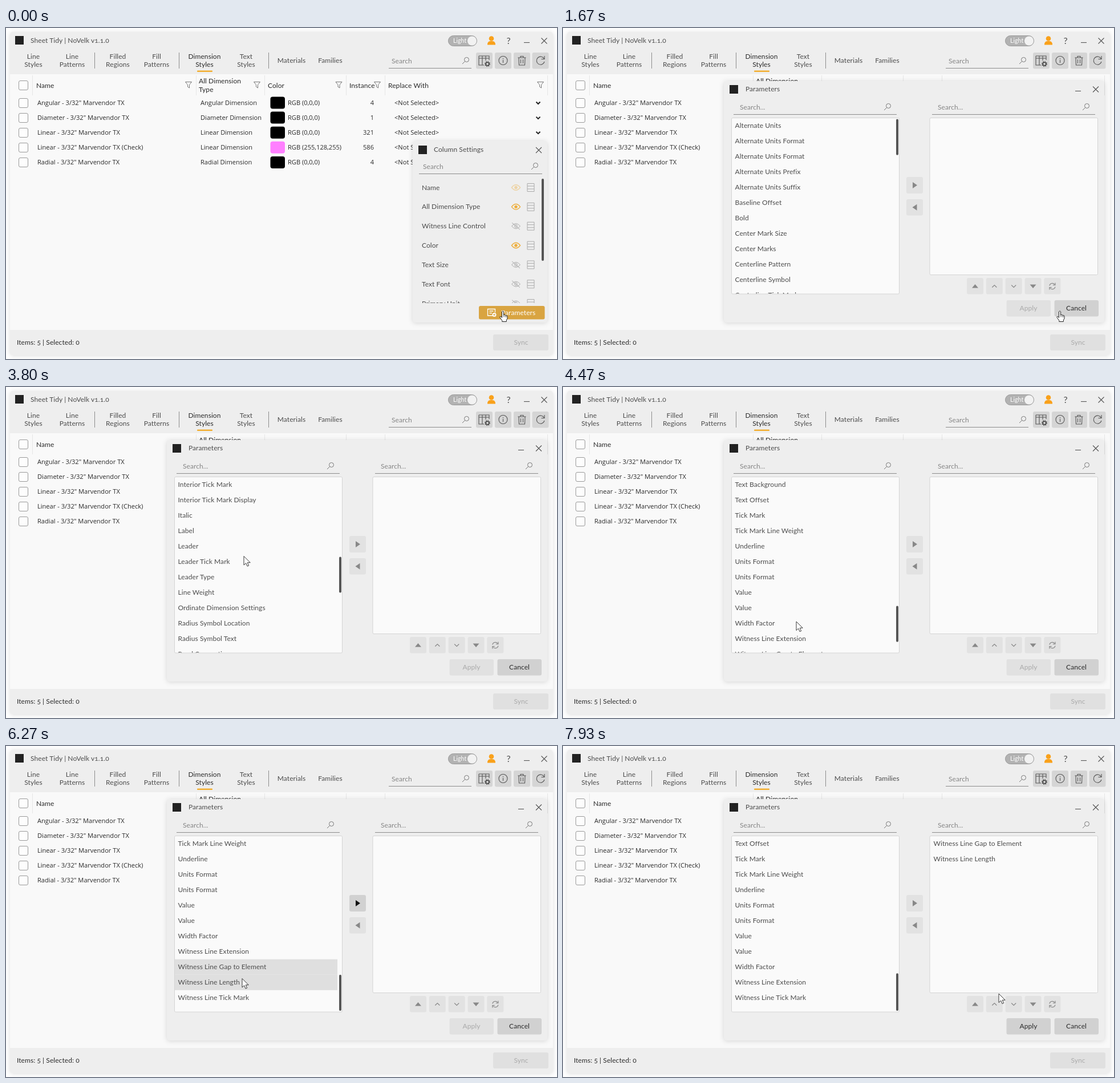
An HTML page for the animation above (8000 ms loop, 966 by 580 pixels).

```html
<!DOCTYPE html>
<html lang="en">
<head>
<meta charset="utf-8">
<title>Column parameters</title>
<style>
  html, body { margin: 0; width: 100%; height: 100%; overflow: hidden; background: #fff; }
  svg { display: block; width: 966px; height: 580px; }
  text { font: 12px Lato, sans-serif; font-variant-numeric: oldstyle-nums; letter-spacing: .07px; fill: #4c4c4c; white-space: pre; }
  .cell { font: 11.1px "Open Sans", "Noto Sans", sans-serif; letter-spacing: 0; fill: #2a2a2a; }
  .dark { fill: #2a2a2a; }
  .hint { fill: #858585; }
  .off { fill: #aaa; }
  .white { fill: #fff; }
  .small { font-size: 10.5px; }
  .large { font-size: 16px; }
  .mid { text-anchor: middle; }
  .end { text-anchor: end; }
  .line { fill: none; stroke: #555; stroke-width: 1.1; }
  .rule { fill: none; stroke: #8c8c8c; }
  .grid { fill: none; stroke: #e6e6e6; }
  .thin { fill: none; stroke: #777; }
  .pale { fill: none; stroke: #aaa; }
  .gold { fill: none; stroke: #eeae3c; stroke-width: 1.5; }
  .bold { fill: none; stroke: #222; stroke-width: 2; }
  .sheet { fill: #eee; filter: drop-shadow(0 1px 4px rgba(0, 0, 0, .14)); }
  .box { fill: #fafafa; stroke: #d4d4d4; }
</style>
</head>
<body>
<svg id="stage" viewBox="0 0 966 580"></svg>
<script>
const text = (x, y, s, cls = "") => `<text x="${x}" y="${y}" class="${cls}">${s}</text>`;
const rect = (x, y, w, h, fill, r = 0, extra = "") =>
  `<rect x="${x}" y="${y}" width="${w}" height="${h}" rx="${r}" fill="${fill}" ${extra}/>`;
const path = (d, cls = "line", extra = "") => `<path d="${d}" class="${cls}" ${extra}/>`;
const at = (x, y, s) => `<g transform="translate(${x} ${y})">${s}</g>`;
const sheet = (x, y, w, h) => rect(x, y, w, h, "#eee", 5, 'class="sheet"');

const mark = (x, y) => rect(x, y, 15, 15, "#222");
const cross = (x, y) => at(x, y, path("M-5-5L5 5M5-5L-5 5"));
const lens = (x, y) => at(x, y, `<circle cx="1.5" cy="-1.5" r="4" class="thin"/>` + path("M-1.5 1.5L-6 6", "thin"));
const search = (x, y, lineX, w, label, lensX) =>
  text(x, y + 4.5, label, "hint") + path(`M${lineX} ${y + 13.5}h${w}`, "rule") + lens(lensX, y);
const funnel = (x, y) => at(x, y, path("M-5.5-5H5.5L1.5 0V5.5L-1.5 3.5V0Z", "thin"));
const check = y => rect(22.5, Math.round(y - 8) + .5, 16, 16, "#fdfdfd", 2.5, 'stroke="#999"');
const button = (x, y, w, h, fill, id = "") => rect(x, y, w, h, fill, 3, id && `id="${id}"`);
const columnIcon = (x, y) => at(x, y, path("M-6-7H6V7H-6ZM-6-2.5H6M-6 2.5H6", "pale"));
const eye = (x, y, state) => at(x, y, state
  ? `<g opacity="${state}">${path("M-7.5 0Q0-9.5 7.5 0Q0 9.5-7.5 0Z", "gold")}<circle r="2.7" fill="#eeae3c"/></g>`
  : path("M-7.5 0Q0-9 7.5 0Q0 9-7.5 0ZM-7-6L7 6", "pale") + `<circle r="2.3" class="pale"/>`);

const tabs = [[48, "Line", "Styles"], [116, "Line", "Patterns"], [196, "Filled", "Regions"], [264, "Fill", "Patterns"],
  [348, "Dimension", "Styles"], [421, "Text", "Styles"]];

const titleBar = () => sheet(7, 7, 952, 566) + rect(7, 81, 952, 448, "#f9f9f9") +
  mark(16, 14) + text(43, 26, "Sheet Tidy | NoVelk v1.1.0") +
  rect(775.5, 13.5, 50, 18, "#b2b2b2", 9, 'stroke="#999"') + text(784, 26, "Light", "white small") +
  `<circle cx="817" cy="22.5" r="8" fill="#f2f2f2"/>` +
  `<circle cx="851" cy="18.5" r="4.3" fill="#f9a11b"/>` +
  path("M844 29.5Q844 23 849 23H853Q858 23 858 29.5Z", "", 'fill="#f9a11b"') +
  text(881, 27.5, "?", "mid large") + path("M908 25.5H918") + cross(943.5, 22.5);

const toolbar = () =>
  tabs.map(([x, a, b]) => {
    const cls = x === 348 ? "mid dark" : "mid";
    return text(x, 54, a, cls) + text(x, 68, b, cls);
  }).join("") +
  path("M155.5 43V71M303.5 43V71M460.5 43V71", "rule") + rect(335, 74.5, 27, 2.5, "#f2ae30", 1) +
  text(500.5, 61, "Materials", "mid") + text(568.5, 61, "Families", "mid") +
  search(676, 57, 671, 145, "Search", 806) +
  [824, 857, 890, 922.5].map(x => button(x, 43, 29, 28.5, "#d5d5d5")).join("") +
  at(838, 57, path("M-9-8H9V-1M-9-8V8H0M-9-4H9M-3-8V8M3-8V0") +
    `<circle cx="6" cy="6" r="2.8" fill="none" stroke="#444" stroke-width="1.6"/>` +
    `<circle cx="6" cy="6" r="4.2" fill="none" stroke="#444" stroke-width="1.4" stroke-dasharray="1.65"/>`) +
  at(871.5, 57, `<circle r="7.5" class="line"/>` + path("M0-1V4M0-4V-2.5")) +
  at(904.5, 57, path("M-7-5H7M-2.5-5V-7.5H2.5V-5M-5.5-5L-5 8H5L5.5-5M-2-2V5M2-2V5")) +
  at(937, 57, path("M6.5-3A7 7 0 1 0 7 2M7-8V-2.5H1.5"));

const rows = [["Angular", 4, ""], ["Diameter", 1, ""], ["Linear", 321, ""], ["Linear", 586, " (Check)"], ["Radial", 4, ""]];
const table = () =>
  path("M46.5 83V118M333.5 83V118M453.5 83V118M596.5 83V118M664.5 83V118M949.5 83V118", "grid") + check(99.5) +
  [[53, "Name"], [459, "Color"], [602, "Instance"], [670, "Replace With"]].map(([x, s]) => text(x, 104.5, s, "dark")).join("") +
  text(338, 97, "All Dimension", "dark") + text(338, 112, "Type", "dark") +
  [320, 440, 583.5, 651, 937].map(x => funnel(x, 99.5)).join("") +
  rows.map(([name, count, note], i) => {
    const y = 131 + 26.1 * i, base = y + 4, pink = note !== "";
    return check(y) + text(55, base, `${name} - 3/32" Marvendor TX${note}`, "cell") +
      text(341, base, name + " Dimension", "cell") +
      rect(463.5, y - 10.5, 25.5, 21, pink ? "#ff80ff" : "#000", 4) +
      text(494, base, pink ? "RGB (255,128,255)" : "RGB (0,0,0)", "cell") +
      text(645, base, count, "cell end") + text(681, base, "&lt;Not Selected&gt;", "cell") +
      path(`M929.5 ${y - 1.5}l3.5 3.5l3.5-3.5`, "bold");
  }).join("") +
  text(19, 555, "Items: 5 | Selected: 0", "dark") + button(854, 537, 97, 28, "#e0e0e0") + text(903, 555, "Sync", "off mid");

const columns = [["Name", .4], ["All Dimension Type", 1], ["Witness Line Control", 0], ["Color", 1],
  ["Text Size", 0], ["Text Font", 0], ["Primary Unit", 0]];
const columnPanel = () => sheet(713, 198, 236, 318) + mark(723, 206) + text(750, 217, "Column Settings") +
  cross(934, 214) + search(731, 242, 724, 216, "Search", 927) +
  `<g clip-path="url(#panelClip)">` + columns.map(([name, state], i) => {
    const y = 279.5 + 33.85 * i;
    return text(729, y + 4, name) + eye(894, y, state) + columnIcon(920, y);
  }).join("") + "</g>" + rect(939, 264, 4, 144, "#555", 2) + button(829, 487, 115.5, 23.5, "#d9a441") +
  at(851, 498.5, path("M2 5.5H-6.5V-6H6.5V0M-3.5-2.5H3.5M-3.5 1H1", "", 'fill="none" stroke="#fff" stroke-width="1.3"') +
    `<circle cx="5" cy="4" r="3.5" fill="#fff"/>` + path("M3 4H7M5 2V6", "", 'stroke="#d9a441"')) +
  text(868, 502.5, "Parameters", "white");

const smallIcons = ["M-5.5 3L0-3.5L5.5 3Z", "M-4 2L0-2L4 2", "M-4-2L0 2L4-2", "M-5.5-3L0 3.5L5.5-3Z",
  "M-5-1A5 5 0 0 1 4-3M5-6V-2H1M5 1A5 5 0 0 1-4 3M-5 6V2H-1"];
const ROW = 27.06, TOP = 157.5, VISIBLE = 11, TRACK = 304.5;
const rowBase = i => TOP + ROW * i + 17.3;
const dialog = () => sheet(282, 93, 667, 423) + mark(292, 100) + text(320, 111, "Parameters") +
  path("M898 110.5H908") + cross(934, 107.5) +
  search(310, 138, 299, 286, "Search...", 569) + search(657, 138, 647, 286, "Search...", 917) +
  rect(295.5, 157.5, 294, 308.5, "#fafafa", 2, 'class="box"') + rect(643, 157.5, 294.5, 275, "#fafafa", 2, 'class="box"') +
  `<g clip-path="url(#listClip)">` + rect(296, 0, 285, ROW, "#dfdfdf", 0, 'id="pick0"') + rect(296, 0, 285, ROW, "#dfdfdf", 0, 'id="pick1"') +
  Array.from({ length: VISIBLE + 1 }, (_, i) => `<text x="301.5" y="${rowBase(i)}" class="item"></text>`).join("") + "</g>" +
  rect(584, 160, 4, 63, "#555", 2, 'id="thumb"') +
  `<g id="moved">${text(649.5, rowBase(0), "Witness Line Gap to Element")}${text(649.5, rowBase(1), "Witness Line Length")}</g>` +
  button(602, 261, 29, 29, "#e2e2e2", "addBox") + path("M613 270V281L621 275.5Z", "", 'id="addIcon" fill="#888"') +
  button(602, 300, 29, 28.5, "#e2e2e2") + path("M620.5 308.7V319.7L612.5 314.2Z", "", 'fill="#888"') +
  smallIcons.map((d, i) => {
    const x = 708 + 33.85 * i, solid = i % 3 === 0;
    return button(x, 438, 29, 28.5, "#e2e2e2") +
      at(x + 14.5, 452.5, path(d, "", solid ? 'fill="#888"' : 'fill="none" stroke="#888" stroke-width="1.2"'));
  }).join("") +
  button(777.5, 477, 77.5, 28.5, "#e1e1e1", "applyBox") + `<text id="apply" x="816" y="495" class="mid">Apply</text>` +
  button(861.5, 477, 77.5, 28.5, "#d1d1d1") + text(900, 495, "Cancel", "mid dark");

const pointers =
  `<g id="arrow">${path("M0 0V15.5L3.7 12.1L6.1 17.6L8.6 16.5L6.3 11.2H11.2Z", "", 'fill="#fff" stroke="#222" stroke-width=".9"')}</g>` +
  `<g id="hand">${path("M-1.5 1Q0-1.5 1.5 1V7Q3 5.5 4 7.2Q5.5 6.3 6 8Q8 7.2 8 9.5V13L6.3 16V18.5H-1.2V16.5L-4.8 11.5Q-5.5 9-3.5 9.5L-1.5 11.5Z",
    "", 'fill="#fff" stroke="#222" stroke-width="1" stroke-linejoin="round"') + path("M1.6 7V10.5M4 8V10.5M6 8.5V11", "", 'stroke="#222" stroke-width=".7"')}</g>`;

const stage = document.getElementById("stage");
stage.innerHTML = `<defs><clipPath id="panelClip">${rect(713, 260, 226, 222, "#000")}</clipPath>` +
  `<clipPath id="listClip">${rect(295, 158, 294, 307.5, "#000")}</clipPath></defs>` +
  titleBar() + toolbar() + table() + `<g id="panel">${columnPanel()}</g><g id="dialog">${dialog()}</g>` + pointers;

const names = `Alternate Units,Alternate Units Format,Alternate Units Format,Alternate Units Prefix,Alternate Units Suffix,
Baseline Offset,Bold,Center Mark Size,Center Marks,Centerline Pattern,Centerline Symbol,Centerline Tick Mark,
Diameter Symbol Location,Diameter Symbol Text,Dimension Line Extension,Dimension Line Snap Distance,Dimension String Type,
Equality Formula,Equality Text,Equality Witness Display,Family Name,Flipped Dimension Line Extension,Group Marks,Image,
Interior Tick Mark,Interior Tick Mark Display,Italic,Label,Leader,Leader Tick Mark,Leader Type,Line Weight,
Ordinate Dimension Settings,Radius Symbol Location,Radius Symbol Text,Read Convention,Show Leader When Text Moves,
Show Opening Height,Suppress Spaces,Text Background,Text Offset,Tick Mark,Tick Mark Line Weight,Underline,Units Format,
Units Format,Value,Value,Width Factor,Witness Line Extension,Witness Line Gap to Element,Witness Line Length,
Witness Line Tick Mark`.split(",").map(s => s.trim());
const PICKS = [50, 51];
const remaining = names.filter((_, i) => !PICKS.includes(i));

// Keys are [time, ...values]; values between keys are eased.
const smooth = u => u * u * (3 - 2 * u);
function sample(keys, t, ease = u => u) {
  const next = keys.findIndex(k => k[0] > t);
  if (next === 0) return keys[0].slice(1);
  if (next < 0) return keys[keys.length - 1].slice(1);
  const a = keys[next - 1], b = keys[next], u = ease((t - a[0]) / (b[0] - a[0]));
  return a.slice(1).map((v, i) => v + (b[i + 1] - v) * u);
}
const cursorKeys = [[0, 871, 496], [2067, 871, 496], [2800, 397, 214.5], [3067, 397, 214.5], [3800, 417, 296.5], [4467, 409, 411],
  [4800, 410, 409], [5200, 428, 384], [5400, 428, 384], [5667, 424, 350], [6133, 414, 407.5], [6467, 414, 407.5],
  [7133, 626, 280], [7200, 626, 280], [7933, 764, 434]];
const scrollKeys = [[3000, 0], [3066, 3], [3800, 24], [4466, 39], [4734, 39], [4800, 42]];

const el = id => document.getElementById(id);
const show = (id, on) => el(id).setAttribute("visibility", on ? "visible" : "hidden");
const fill = (id, color) => { el(id).style.fill = color; };
const items = [...document.querySelectorAll(".item")];
const inside = (x, y, x0, y0, x1, y1) => x >= x0 && x <= x1 && y >= y0 && y <= y1;

function draw(time) {
  const step = Math.floor((time + 4) * 15 / 1000), t = step * 1000 / 15 + .5;
  const open = t > 1660, transferred = t > 7260;
  const picked = [t > 5260 && !transferred, t > 6190 && !transferred];
  const ready = picked[0];

  el("panel").setAttribute("opacity", Math.min(1, Math.max(0, 1 - (step - 14) / 3)));
  el("dialog").setAttribute("display", open ? "inline" : "none");

  const list = transferred ? remaining : names;
  const offset = transferred ? list.length - VISIBLE : 3 * Math.round(sample(scrollKeys, t)[0] / 3);
  items.forEach((node, i) => { node.textContent = list[offset + i] || ""; });
  picked.forEach((on, i) => {
    show("pick" + i, on);
    el("pick" + i).setAttribute("y", TOP + ROW * (PICKS[i] - offset) - .3);
  });
  el("thumb").setAttribute("y", 159.5 + TRACK * offset / list.length);
  el("thumb").setAttribute("height", TRACK * VISIBLE / list.length);

  show("moved", transferred);
  fill("addBox", ready ? "#d1d1d1" : "#e2e2e2");
  fill("addIcon", ready ? "#111" : "#888");
  fill("applyBox", transferred ? "#d1d1d1" : "#e1e1e1");
  fill("apply", transferred ? "#2a2a2a" : "#aaa");

  const [x, y] = sample(cursorKeys, t, smooth);
  const hand = t < 1400 || open && (inside(x, y, 862, 477, 939, 505) || ready && inside(x, y, 602, 261, 631, 290));
  show("hand", hand);
  show("arrow", !hand);
  el(hand ? "hand" : "arrow").setAttribute("transform", `translate(${x.toFixed(1)} ${y.toFixed(1)})`);
}

function tick() {
  draw(performance.now() % 8000);
  requestAnimationFrame(tick);
}
tick();
</script>
</body>
</html>
```
